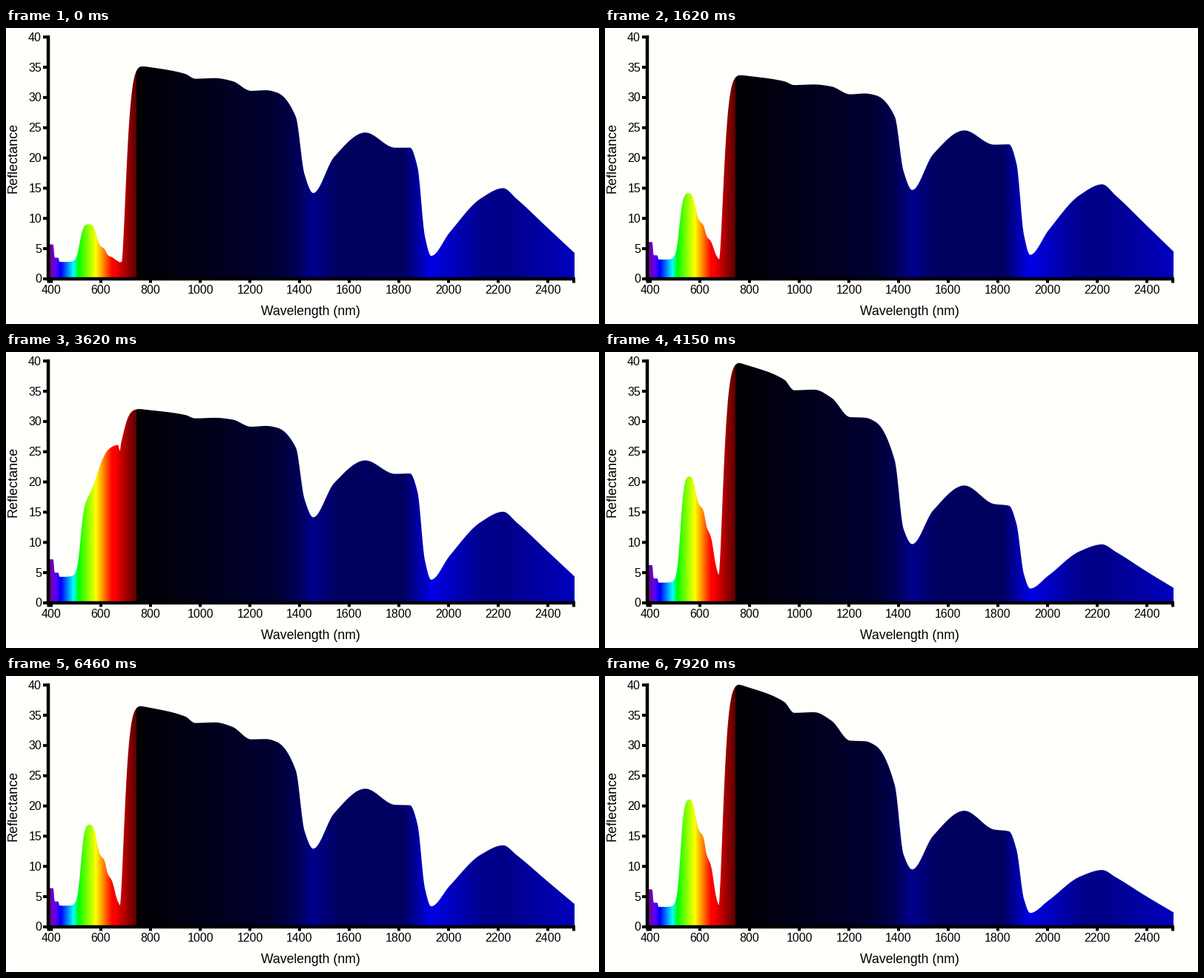
A matplotlib script for the animation above (8000 ms loop, 800 px wide and 400 px high).

```python
import numpy as np
import matplotlib.pyplot as plt
from matplotlib.animation import FuncAnimation
from matplotlib.patches import Polygon

W, H, DPI = 800, 400, 100
LOOP, STEP = 8000, 80
PX = 72 / DPI
BG = "#fffffc"
LEFT, RIGHT, BASE = 59, 767, 339

# Infrared key points: wavelength, moist leaf, dry leaf
INFRARED = np.array([
    (755, 40.2, 35.3), (940, 37.2, 33.9), (980, 35.4, 33.1),
    (1060, 35.5, 33.2), (1130, 34.1, 32.7), (1205, 30.8, 31.1),
    (1265, 30.7, 31.2), (1310, 29.9, 30.8), (1385, 23.4, 26.8),
    (1420, 12, 17.3), (1455, 9.5, 14.2), (1540, 15.1, 20.2),
    (1665, 19.2, 24.2), (1785, 16.1, 21.7), (1845, 15.8, 21.7),
    (1875, 12.8, 18.5), (1905, 4.6, 7.0), (1930, 2.3, 3.8),
    (2005, 4.4, 7.7), (2130, 8.3, 13.3), (2220, 9.4, 15.0),
    (2275, 8.2, 13.2), (2400, 5.0, 8.4), (2507, 2.4, 4.3)])
# Wavelength and amount of blue in the infrared part
BLUE = [(744, 3), (1300, 50), (1390, 85), (1450, 140), (1560, 95),
        (1820, 98), (1930, 230), (2120, 145), (2220, 135), (2507, 190)]


def to_x(nm):
    return 61 + (nm - 400) * 0.335


def to_nm(x):
    return 400 + (x - 61) / 0.335


def to_y(value):
    return BASE - value * 8.17


def step(nm, centre, width):
    return 0.5 + 0.5 * np.tanh((nm - centre) / (2 * width))


def smooth_curve(x, y, xs):
    """Monotone cubic through the points."""
    h = np.diff(x)
    d = np.diff(y) / h
    m = np.concatenate([d[:1], np.zeros(len(d) - 1), d[-1:]])
    a, b = d[:-1], d[1:]
    w1, w2 = 2 * h[1:] + h[:-1], h[1:] + 2 * h[:-1]
    same = a * b > 0
    m[1:-1] = np.where(same, (w1 + w2) * a * b / np.where(same, w1 * b + w2 * a, 1), 0)
    i = np.clip(np.searchsorted(x, xs, side="right") - 1, 0, len(h) - 1)
    t = (xs - x[i]) / h[i]
    return (y[i] * (1 + 2 * t) * (1 - t) ** 2 + y[i + 1] * t * t * (3 - 2 * t)
            + h[i] * t * (1 - t) * (m[i] * (1 - t) - m[i + 1] * t))


xs = np.linspace(LEFT, RIGHT, 1417)
NM = to_nm(xs)


def leaf(dryness, scale, violet, hump, fade, edge, red=0):
    """Reflectance of one leaf: violet steps, green hump, red edge, infrared."""
    base = violet - 2.2 * step(NM, 411, 0.8) - 0.7 * step(NM, 431, 0.8)
    rise = step(NM, 511 + 0.6 * hump, 7)
    fall = (fade * step(NM, 583, 6.5) + 0.22 * step(NM, 621, 4)
            + (0.78 - fade) * step(NM, 656, 7))
    visible = base + hump * rise * (1 - (1 - red) * fall)
    visible += 10 * red * step(NM, 585, 20)
    visible *= 1 - 0.04 * np.exp(-((NM - 676) / 4) ** 2)
    nm, moist, dry = INFRARED.T
    infrared = scale * smooth_curve(nm, moist + dryness * (dry - moist),
                                    np.clip(NM, nm[0], nm[-1]))
    mix = 1 - np.exp(-(np.maximum(NM - edge, 0) / 26) ** 1.55)
    return visible + (infrared - visible) * mix


dark = leaf(1, 1, 5.7, 6.3, 0.63, 684)
green = leaf(1.17, 0.98, 6.1, 11.1, 0.46, 678)
autumn = leaf(1.2, 0.935, 7.2, 12, 0.3, 677, red=1)
bright = leaf(0, 1, 6.2, 18, 0.33, 676)
mixed = leaf(0.73, 1, 6.4, 13.6, 0.42, 677)

KEYS = [(0, dark), (1620, green), (3620, autumn), (4150, bright),
        (4550, bright), (5550, mixed), (6460, mixed), (7920, bright),
        (LOOP, bright)]


def values_at(ms):
    for (t0, a), (t1, b) in zip(KEYS, KEYS[1:]):
        if ms < t1:
            u = (ms - t0) / (t1 - t0)
            return a + (b - a) * u * u * (3 - 2 * u)


def colours(nm):
    """Spectral colours, then black turning blue beyond the visible range."""
    r = np.interp(nm, [380, 440, 510, 580], [1, 0, 0, 1])
    g = np.interp(nm, [440, 490, 580, 645], [0, 1, 1, 0])
    b = np.interp(nm, [490, 510], [1, 0])
    light = np.interp(nm, [380, 420, 655, 744], [0.3, 1, 1, 0.34])
    rgb = np.stack([r, g, b], axis=-1) * light[:, None]
    far = nm > 744
    rgb[far] = 0
    rgb[far, 2] = np.interp(nm[far], *zip(*BLUE)) / 255
    return rgb


fig = plt.figure(figsize=(W / DPI, H / DPI), dpi=DPI, facecolor=BG)
ax = fig.add_axes([0, 0, 1, 1])
ax.axis("off")

# Coloured columns; a background shape hides what lies above the curve
strip = colours(to_nm(np.arange(LEFT, RIGHT) + 0.5))
ax.imshow(strip[None], extent=(LEFT, RIGHT, BASE, 0), aspect="auto",
          interpolation="nearest", zorder=1)
ax.set_xlim(0, W)
ax.set_ylim(H, 0)
cover = Polygon([(0, 0), (1, 0), (1, 1)], closed=True, facecolor=BG,
                edgecolor="none", zorder=2)
ax.add_patch(cover)


def line(x, y, width):
    ax.plot(x, y, color="black", lw=width * PX, solid_capstyle="butt",
            snap=False, zorder=3)


def label(x, y, text, size, **style):
    ax.text(x, y, text, fontsize=size * PX, family="Liberation Sans",
            color="black", va="baseline", zorder=4, **style)


line([57, 57], [10, 341.5], 4.5)
line([54.8, 768], [BASE, BASE], 4.5)
for value in range(0, 41, 5):
    y = to_y(value)
    line([50, 56], [y, y], 4)
    label(48, y + 5.5, str(value), 16, ha="right")
for nm in range(400, 2401, 200):
    x = to_x(nm)
    line([x, x], [BASE, 344.5], 4)
    label(x, 359, str(nm), 16, ha="center")
for x in (57.5, 766):
    line([x, x], [BASE, 344.5], 4)

label(410.5, 388, "Wavelength (nm)", 17.6, ha="center")
label(15, 175.5, "Reflectance", 18, ha="center", rotation=90,
      rotation_mode="anchor")


def draw(i):
    ys = to_y(values_at(i * STEP))
    top = [(RIGHT + 1, ys[-1]), (RIGHT + 1, -2), (LEFT - 1, -2), (LEFT - 1, ys[0])]
    cover.set_xy(np.vstack([np.column_stack([xs, ys]), top]))
    return (cover,)


anim = FuncAnimation(fig, draw, frames=LOOP // STEP, interval=STEP,
                     repeat=True, repeat_delay=0, blit=False)
plt.show()
```
